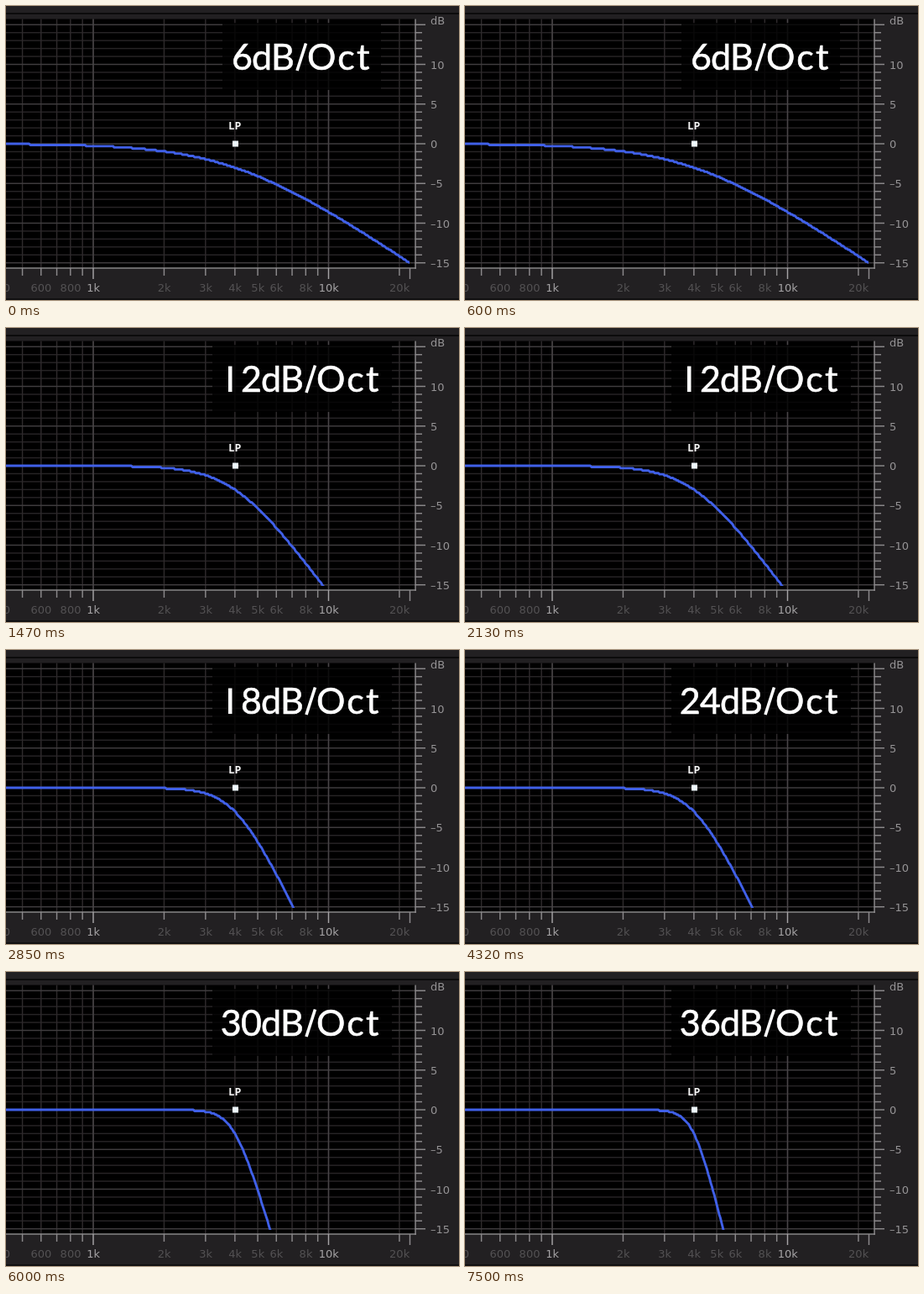
An HTML page with a canvas for the animation above (8000 ms loop, 540x350 px).

```html
<!DOCTYPE html>
<html lang="en">
<head>
<meta charset="utf-8">
<title>Low-pass filter slopes</title>
<style>
html, body { margin: 0; width: 100%; height: 100%; overflow: hidden; background: #222022; }
canvas { display: block; width: 540px; height: 350px; }
</style>
</head>
<body>
<canvas id="stage" width="540" height="350"></canvas>
<script>
const ctx = document.getElementById('stage').getContext('2d');

const LOOP = 8000;
const CUTOFF = 4000;
const RIGHT = 488, TOP = 15.5, BOTTOM = 312, ZERO = 164;
const PX_PER_DB = 9.45, PX_PER_DECADE = 280.5, X_1K = 104;
const DOT = 1.45; // size of one plotted pixel
const AXIS_FONT = '13px "DejaVu Sans", sans-serif';

// Start times of filter orders 1 to 6
const labelTimes = [0, 1470, 2850, 4320, 5820, 7410];
const curveTimes = [0, 1470, 2850, 4350, 5820, 7410];

const xOf = f => X_1K + PX_PER_DECADE * Math.log10(f / 1000);
const freqAt = x => 1000 * 10 ** ((x - X_1K) / PX_PER_DECADE);
const yOf = db => ZERO - db * PX_PER_DB;
const orderAt = (times, t) => times.filter(s => s <= t).length;
const isDecade = f => f === 1000 || f === 10000;

function box(x, y, w, h, color) {
  ctx.fillStyle = color;
  ctx.fillRect(x, y, w, h);
}

const hLine = (x, y, w, color) => box(x, y - DOT / 2, w, DOT, color);
const vLine = (x, y, h, color) => box(x - DOT / 2, y, DOT, h, color);

function text(str, x, y, color, align = 'left', font = AXIS_FONT) {
  ctx.font = font;
  ctx.fillStyle = color;
  ctx.textAlign = align;
  ctx.fillText(str, x, y);
}

function frequencies() {
  const list = [];
  for (const base of [100, 1000, 10000])
    for (let k = 1; k < 10; k++) list.push(k * base);
  return list.filter(f => f >= 400 && f <= 20000);
}

function drawPanel() {
  box(0, 0, 540, 350, '#222022');
  box(0, 8, 540, 2, '#0b0b0b');
  box(0, 348, 540, 2, '#111011');
  box(0, TOP, RIGHT, BOTTOM - TOP, '#000');
}

function drawGrid() {
  const height = BOTTOM - TOP;
  for (let db = -15; db <= 15; db++)
    if (db % 5) hLine(0, yOf(db), RIGHT, '#272426');
  for (const f of frequencies())
    vLine(xOf(f), TOP, height, '#2e2a2c');
  for (let db = -15; db <= 15; db += 5)
    hLine(0, yOf(db), RIGHT, '#403d3f');
  for (const f of [1000, 10000])
    vLine(xOf(f), TOP, height, '#484547');
}

function drawAxes() {
  const line = '#8b898b';
  vLine(RIGHT, TOP, BOTTOM - TOP + 1, line);
  hLine(0, BOTTOM, RIGHT + 1, line);

  for (let db = -15; db <= 15; db++) {
    const major = db % 5 === 0;
    hLine(RIGHT, yOf(db), major ? 12 : 8, line);
    if (major) {
      const name = db === 15 ? 'dB' : String(db).replace('-', '–');
      text(name, 506, db === 15 ? 22 : yOf(db) + 5, '#959395');
    }
  }

  for (const f of frequencies()) {
    const major = isDecade(f);
    vLine(xOf(f), BOTTOM, major ? 13 : 9, major ? '#a5a3a5' : line);
    if (![500, 700, 900, 7000, 9000].includes(f)) {
      const name = f < 1000 ? String(f) : f / 1000 + 'k';
      text(name, xOf(f) + 0.2, 340, major ? '#a5a3a5' : '#535153', 'center');
    }
  }
  vLine(481.5, BOTTOM, 13, line);
}

function drawCurve(order) {
  ctx.save();
  ctx.beginPath();
  ctx.rect(0, TOP, 481, 307 - TOP);
  ctx.clip();
  ctx.beginPath();
  for (let x = -DOT; x <= 482; x += DOT) {
    const loss = 10 * Math.log10(1 + (freqAt(x) / CUTOFF) ** (2 * order));
    const y = ZERO + DOT * Math.round(loss * PX_PER_DB / DOT);
    ctx.lineTo(x, y);
    if (y > 320) break;
  }
  ctx.strokeStyle = '#4060e8';
  ctx.lineWidth = 2 * DOT;
  ctx.lineJoin = 'round';
  ctx.stroke();
  ctx.restore();
}

function drawHandle() {
  text('LP', 272.8, 147, '#f4f4f4', 'center', '700 12.5px "Open Sans", sans-serif');
  box(270, 160.5, 7, 7, '#effaff');
}

function labelPart(str, x, align, spacing) {
  ctx.letterSpacing = spacing + 'px';
  text(str, x, 76, '#fff', align, '43px Lato, sans-serif');
  ctx.strokeText(str, x, 76);
  ctx.letterSpacing = '0px';
}

function drawLabel(order) {
  const wide = order > 1;
  box(wide ? 246 : 258, 20, wide ? 214 : 189, 80, 'rgba(0,0,0,0.8)');

  const shift = wide ? 11 : 0;
  const level = String(order * 6);
  const barOne = level[0] === '1';
  ctx.strokeStyle = '#fff';
  ctx.lineWidth = 0.6;
  labelPart((barOne ? level[1] : level) + 'dB', 343 + shift, 'right', -0.8);
  labelPart('Oct', 359 + shift, 'left', 2.2);
  // The numeral one is a plain bar
  if (barOne) box(265, 45.5, 4.5, 30.5, '#fff');

  ctx.beginPath();
  ctx.moveTo(347 + shift, 77);
  ctx.lineTo(357.5 + shift, 44.5);
  ctx.lineWidth = 3.6;
  ctx.stroke();
}

function draw(now) {
  const t = now % LOOP;
  drawPanel();
  drawGrid();
  drawAxes();
  drawCurve(orderAt(curveTimes, t));
  drawHandle();
  drawLabel(orderAt(labelTimes, t));
}

let start;
function tick() {
  const now = performance.now();
  start ??= now;
  draw(now - start);
  requestAnimationFrame(tick);
}
tick();
</script>
</body>
</html>
```
